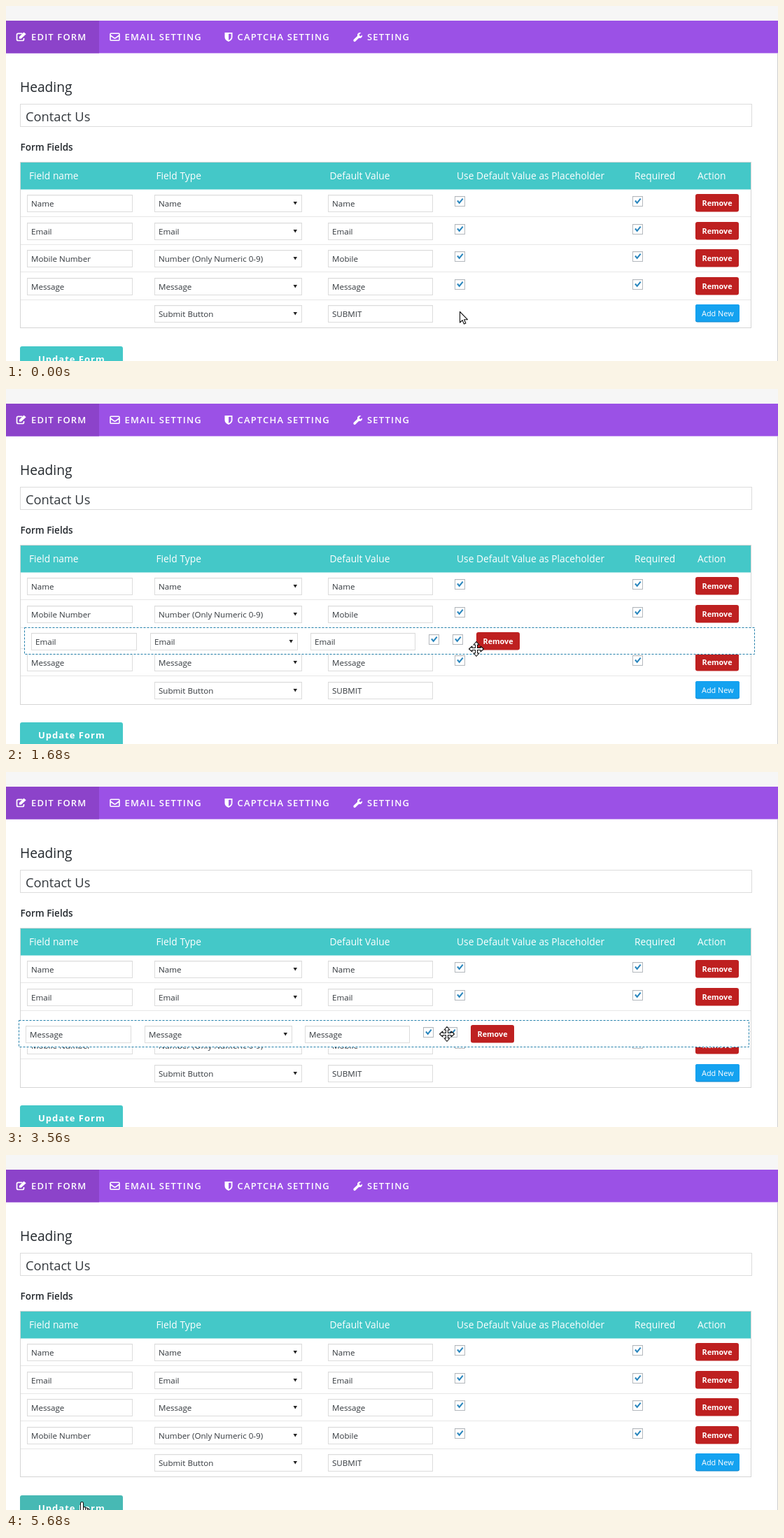
These frames come from a looping animation (1103x508 px, 6.51 s). An HTML page with a canvas:

```html
<!DOCTYPE html>
<html lang="en">
<head>
<meta charset="utf-8">
<title>Sortable form fields</title>
<style>
  html, body { margin: 0; width: 100%; height: 100%; overflow: hidden; background: #fff; }
  canvas { display: block; width: 1103px; height: 508px; }
</style>
</head>
<body>
<canvas id="stage" width="1103" height="508"></canvas>
<script>
const ctx = document.getElementById('stage').getContext('2d');
const LOOP = 6510;
const FONT = '"Open Sans", "Noto Sans", sans-serif';
const TEAL = '#44c8c8';
const ROW_H = 39.45, GAP_H = 30, TABLE_TOP = 262;

const FIELDS = {
  name: ['Name', 'Name', 'Name'],
  email: ['Email', 'Email', 'Email'],
  mobile: ['Mobile Number', 'Number (Only Numeric 0-9)', 'Mobile'],
  message: ['Message', 'Message', 'Message']
};

// Column positions: in the table, and in a row lifted out of it
const TABLE_COLS = { name: 30, type: 212, value: 460, check: 641, required: 895, action: 985 };
const DRAG_COLS = { name: 10, type: 180, value: 409, check: 578, required: 612, action: 646 };

// Pointer path: time, x, y, cursor shape
const PATH = [
  [0, 648, 437, 'arrow'],
  [30, 648, 437, 'arrow'],
  [120, 650, 412, 'move'],
  [300, 655, 350, 'move'],
  [450, 663, 309, 'move'],
  [600, 665, 320, 'move'],
  [699, 665, 320, 'move'],
  [700, 666, 321, 'move'],
  [1260, 666, 321, 'move'],
  [1500, 671, 348, 'move'],
  [1680, 672, 372, 'move'],
  [1910, 669, 358, 'move'],
  [2100, 667, 326, 'move'],
  [2280, 631.5, 382.5, 'move'],
  [2580, 632, 398, 'move'],
  [2790, 630, 414, 'move'],
  [2970, 640, 408, 'move'],
  [3250, 633.5, 398, 'move'],
  [3380, 633.5, 398, 'move'],
  [3650, 629, 364, 'hand'],
  [3740, 628.5, 361.5, 'hand'],
  [4000, 628.5, 361.5, 'hand'],
  [4020, 628, 363, 'move'],
  [4500, 606, 412, 'move'],
  [4590, 590, 421, 'arrow'],
  [4650, 566, 426, 'arrow'],
  [4890, 201.5, 468, 'arrow'],
  [5320, 107, 497, 'arrow'],
  [5679, 107, 497, 'arrow'],
  [5680, 108, 497, 'arrow']
];

const DRAGS = [
  { key: 'email', from: 1260, to: 2110, grab: [645.5, 19], lag: 92 },
  { key: 'message', from: 3380, to: 4020, grab: [612, 20.5], lag: 0 }
];

function pointerAt(t) {
  let i = PATH.length - 1;
  while (i > 0 && PATH[i][0] > t) i--;
  const a = PATH[i], b = PATH[i + 1] || a;
  const k = b === a ? 0 : (t - a[0]) / (b[0] - a[0]);
  return { x: a[1] + (b[1] - a[1]) * k, y: a[2] + (b[2] - a[2]) * k, shape: a[3] };
}

function orderAt(t) {
  const swapped = (t >= 1570 && t < 2030) || t >= 3560;
  if (!swapped) return ['name', 'email', 'mobile', 'message'];
  return t < 3000 ? ['name', 'mobile', 'email', 'message'] : ['name', 'email', 'message', 'mobile'];
}

function text(str, x, y, size, color, weight = 400, spacing = 0) {
  ctx.font = `${weight} ${size}px ${FONT}`;
  ctx.letterSpacing = spacing + 'px';
  ctx.fillStyle = color;
  ctx.fillText(str, x, y);
}

function rect(x, y, w, h, color) {
  ctx.fillStyle = color;
  ctx.fillRect(x, y, w, h);
}

function frame(x, y, w, h, color) {
  ctx.strokeStyle = color;
  ctx.lineWidth = 1;
  ctx.strokeRect(x + 0.5, y + 0.5, w - 1, h - 1);
}

function button(x, y, w, h, color) {
  ctx.fillStyle = color;
  ctx.beginPath();
  ctx.roundRect(x, y, w, h, 3);
  ctx.fill();
}

function line(points, color, width) {
  ctx.strokeStyle = color;
  ctx.lineWidth = width;
  ctx.beginPath();
  points.forEach(([x, y]) => ctx.lineTo(x, y));
  ctx.stroke();
}

function at(x, y, draw) {
  ctx.save();
  ctx.translate(x, y);
  draw();
  ctx.restore();
}

function input(x, y, w, value) {
  rect(x, y, w, 25, '#fff');
  rect(x + 1, y + 1, w - 2, 1, '#f5f5f5');
  frame(x, y, w, 25, '#dcdcdc');
  text(value, x + 6, y + 17, 11.6, '#32373c');
}

function select(x, y, value) {
  input(x, y, 211, value);
  ctx.fillStyle = '#222';
  ctx.beginPath();
  ctx.moveTo(x + 198.5, y + 10);
  ctx.lineTo(x + 204, y + 10);
  ctx.lineTo(x + 201.25, y + 14.5);
  ctx.fill();
}

function checkbox(x, y) {
  rect(x, y, 15, 15, '#fff');
  rect(x + 1, y + 1, 13, 1, '#f1f1f1');
  frame(x, y, 15, 15, '#b4b9be');
  line([[x + 4, y + 6.5], [x + 6.7, y + 9.8], [x + 11.7, y + 3.7]], '#2a86bd', 2.1);
}

function fieldRow(key, left, top, cols) {
  const [name, type, value] = FIELDS[key];
  const y = Math.round(top + 8.3), cy = Math.round(top + 10.3), by = Math.round(top + 7.3);
  input(left + cols.name, y, 151, name);
  select(left + cols.type, y, type);
  input(left + cols.value, y, 150, value);
  checkbox(left + cols.check, cy);
  checkbox(left + cols.required, cy);
  button(left + cols.action, by, 62, 25.5, '#be2020');
  text('Remove', left + cols.action + 9.5, by + 17, 10.8, '#fff', 700);
}

const ICONS = {
  edit() {
    ctx.lineWidth = 1.7;
    ctx.stroke(new Path2D('M9 1.9H3Q1 1.9 1 3.9V10Q1 12 3 12H9Q11 12 11 10V8.5'));
    ctx.fill(new Path2D('M4.4 9.2V6.6L11 0 14.2 2.8 7.2 9.2Z'));
  },
  mail() {
    ctx.lineWidth = 1.6;
    ctx.stroke(new Path2D('M2 1.3H13Q14 1.3 14 2.3V10.2Q14 11.2 13 11.2H2Q1 11.2 1 10.2V2.3Q1 1.3 2 1.3ZM1.2 4 6.5 7.8Q7.5 8.4 8.5 7.8L13.8 4'));
  },
  shield() {
    ctx.fill(new Path2D('M0 0H11V6.5Q11 10.5 5.5 13 0 10.5 0 6.5ZM5.6 1.8V11Q9.2 9 9.2 6.5V1.8Z'), 'evenodd');
  },
  wrench() {
    ctx.fill(new Path2D('M.7 10.1 6 5Q5.4 2.2 7.4.8 9.2-.4 11.4.4L8.8 2.4V4.3L10.4 5.2 13.1 3.4Q13.4 6 11.4 7.4 9.9 8.3 8.3 7.8L3.1 12.8Q1.8 13.6.8 12.6-.2 11.3.7 10.1Z'));
  }
};

function icon(kind, x, y) {
  at(x, y, () => {
    ctx.fillStyle = ctx.strokeStyle = '#fff';
    ICONS[kind]();
  });
}

function page() {
  rect(0, 0, 1103, 508, '#fff');
  rect(0, 0, 1103, 21, '#f6f6f6');
  rect(0, 21, 1103, 46.5, '#9b51e6');
  rect(0, 21, 133, 46.5, '#8c43ca');
  rect(1102, 68, 1, 440, '#cfcfcf');

  icon('edit', 14.5, 37.5);
  icon('mail', 148, 38);
  icon('shield', 312.5, 38);
  icon('wrench', 496, 38);
  const tabs = [['EDIT FORM', 36], ['EMAIL SETTING', 169.5], ['CAPTCHA SETTING', 330.5], ['SETTING', 516]];
  tabs.forEach(([label, x]) => text(label, x, 49, 13, '#fff', 600, 1.17));

  text('Heading', 20, 123, 19.2, '#23282d');
  frame(20, 140, 1046, 33, '#dcdcdc');
  text('Contact Us', 28, 164.5, 18.3, '#32373c');
  text('Form Fields', 20.5, 207, 13.5, '#23282d', 600);
}

function table(order, lifted, hover) {
  let top = TABLE_TOP;
  order.forEach(key => {
    if (key !== lifted) fieldRow(key, 0, top, TABLE_COLS);
    top += key === lifted ? GAP_H : ROW_H;
    rect(21, Math.round(top), 1043, 1, '#e7e7e7');
  });

  const y = Math.round(top + 8.3), by = Math.round(top + 7.3);
  select(TABLE_COLS.type, y, 'Submit Button');
  input(TABLE_COLS.value, y, 150, 'SUBMIT');
  button(985, by, 63, 25.5, '#0f86cb');
  button(985, by, 63, 24.5, '#14a2f0');
  text('Add New', 994, by + 16.5, 10.9, '#fff');

  const end = top + ROW_H;
  frame(20, 223, 1045, Math.round(end + 1.2) - 222, '#d5d5d5');
  rect(21, 224, 1043, 38.5, TEAL);
  const heads = [
    ['Field name', 33], ['Field Type', 214.5], ['Default Value', 462.5],
    ['Use Default Value as Placeholder', 644], ['Required', 898], ['Action', 988]
  ];
  heads.forEach(([label, x]) => text(label, x, 248, 13.8, '#fff'));

  const uy = Math.round(end + 27.4);
  button(20, uy, 147, 40, hover ? '#47b9b4' : TEAL);
  text('Update Form', 46, uy + 23, 13, '#fff', 700, 1);
}

function liftedRow(drag, t) {
  const p = pointerAt(Math.max(drag.from, t - drag.lag));
  const left = Math.round(p.x - drag.grab[0]), top = Math.round(p.y - drag.grab[1]);
  rect(left, top, 1044, 39, '#fff');
  ctx.setLineDash([3, 2]);
  frame(left, top, 1044, 39, '#2380ab');
  ctx.setLineDash([]);
  fieldRow(drag.key, left, top, DRAG_COLS);
}

function movePath() {
  const arm = [[-1.5, -1.5], [-1.5, -6], [-4, -6], [0, -10.5], [4, -6], [1.5, -6]];
  const path = new Path2D();
  for (let i = 0; i < 4; i++) {
    const c = Math.round(Math.cos(i * Math.PI / 2)), s = Math.round(Math.sin(i * Math.PI / 2));
    arm.forEach(([x, y]) => path.lineTo(x * c - y * s, x * s + y * c));
  }
  path.closePath();
  return path;
}

const CURSORS = {
  arrow: new Path2D('M.5.5V16L4.1 12.6 6.4 18 8.9 17 6.6 11.7H11.4Z'),
  hand: new Path2D('M-1.5 1.5Q-1.5-.5.5-.5 2.5-.5 2.5 1.5V7Q5 6 5.8 8 8 7.2 8.6 9.2 11 8.8 11 11V15Q11 18 9 20V22H0V20L-5 13.5Q-6 11-3.5 11.5L-1.5 13.5Z'),
  move: movePath()
};

function cursor(x, y, shape) {
  at(Math.round(x), Math.round(y), () => {
    ctx.fillStyle = '#fff';
    ctx.strokeStyle = '#111';
    ctx.lineWidth = 1.1;
    ctx.lineJoin = 'round';
    ctx.fill(CURSORS[shape]);
    ctx.stroke(CURSORS[shape]);
    if (shape === 'hand') ctx.stroke(new Path2D('M2.5 7V12M5.7 8V12M8.5 9.2V12.5'));
  });
}

function render(t) {
  const p = pointerAt(t);
  const drag = DRAGS.find(d => t >= d.from && t < d.to);
  const hover = p.x < 167 && p.y >= 487;
  page();
  table(orderAt(t), drag && drag.key, hover);
  if (drag) liftedRow(drag, t);
  cursor(p.x, p.y, hover ? 'hand' : p.shape);
}

const start = performance.now();
function tick() {
  render((performance.now() - start) % LOOP);
  requestAnimationFrame(tick);
}
tick();
</script>
</body>
</html>
```
